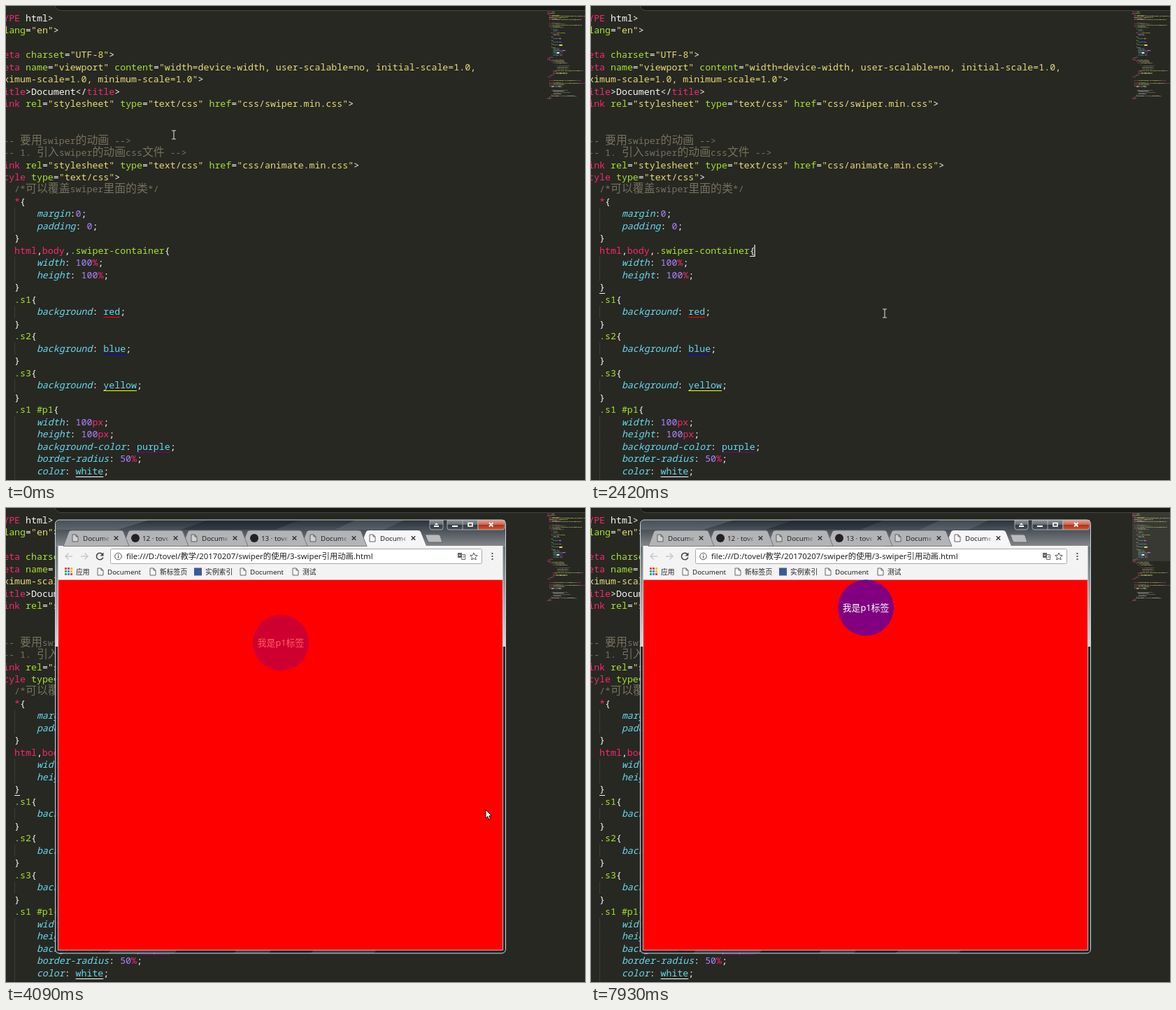
Recreate the animation shown at these times as an HTML page. Size 828 by 677 pixels, loop 8000 ms.

```html
<!DOCTYPE html>
<html lang="zh">
<head>
<meta charset="utf-8">
<title>Swiper animation lesson</title>
<style>
html, body { margin: 0; width: 100%; height: 100%; overflow: hidden; background: #272822; }
#stage { position: relative; width: 828px; height: 677px; overflow: hidden; }
#stage > svg { position: absolute; left: 0; top: 0; }
.code { position: absolute; left: -51.5px; top: 8.7px; font: 500 13.25px "Noto Sans Mono", monospace; color: #f8f8f2; }
.code div { height: 17.49px; line-height: 17.49px; white-space: pre; }
.code i { font-style: normal; }
.code b { font: 400 15.9px/0 "Noto Sans CJK SC", sans-serif; }
.code .p { color: #f92672; }
.code .g { color: #a6e22e; }
.code .y { color: #e6db74; }
.code .v { color: #ae81ff; }
.code .k { color: #75715e; }
.code .c { color: #66d9ef; font-style: italic; }
.code .u { color: #66d9ef; text-decoration: underline 1.2px var(--u); text-underline-offset: 3px; text-decoration-skip-ink: none; }
#map { position: absolute; left: 774px; top: 8px; width: 54px; height: 132px; overflow: hidden; filter: brightness(1.3); }
#map .code { left: 0; top: 0; font-weight: 700; transform: scale(.09); transform-origin: 0 0; }
#map .u { background: var(--u); }
.ui { font-family: "Noto Sans", "Noto Sans CJK SC", sans-serif; font-size: 9.8px; }
</style>
</head>
<body>
<div id="stage">
  <div class="code" id="code"></div>
  <div id="map"></div>
  <svg width="828" height="677" class="ui">
    <defs>
      <linearGradient id="glass" x2="0" y2="1">
        <stop stop-color="#2a3138"/><stop offset=".5" stop-color="#555c62"/><stop offset="1" stop-color="#85898c"/>
      </linearGradient>
      <linearGradient id="side" x2="0" y2="1">
        <stop stop-color="#6b7074"/><stop offset="1" stop-color="#d5d9dc"/>
      </linearGradient>
      <linearGradient id="close" x2="0" y2="1">
        <stop stop-color="#e0a192"/><stop offset=".45" stop-color="#cf6450"/><stop offset=".5" stop-color="#b5301c"/><stop offset="1" stop-color="#c65a3c"/>
      </linearGradient>
      <linearGradient id="button" x2="0" y2="1">
        <stop stop-color="#8a9094"/><stop offset=".48" stop-color="#656b70"/><stop offset=".5" stop-color="#33393e"/><stop offset="1" stop-color="#4c5358"/>
      </linearGradient>
      <linearGradient id="fade" gradientUnits="userSpaceOnUse" x1="27" x2="41">
        <stop stop-color="#222"/><stop offset="1" stop-color="#222" stop-opacity="0"/>
      </linearGradient>
      <clipPath id="frame"><rect x="71" y="17" width="644" height="619" rx="5"/></clipPath>
    </defs>

    <!-- editor chrome -->
    <path d="M70 0Q73 6.5 79 6.5H828V0z" fill="#191a16"/>
    <path d="M70 0Q73 6.5 79 6.5H828" fill="none" stroke="#45463f"/>
    <path d="M0 676H828V677H0z" fill="#1f201b"/>
    <g id="guides" fill="#3b3c35"></g>
    <rect id="view" x="774" y="7" width="54" height="69" fill="#fff" opacity=".08"/>
    <g fill="#f8f8f2">
      <rect id="caret" x="233.5" y="341" width="1.2" height="17"/>
      <rect id="open" x="227" y="357" width="7" height="1"/>
      <rect id="shut" x="12" y="410" width="8" height="1"/>
    </g>

    <g id="win">
      <g clip-path="url(#frame)">
        <rect x="70" y="17" width="646" height="620" fill="#23292b" opacity=".93"/>
        <rect x="70" y="17" width="646" height="38" fill="url(#glass)"/>
        <path d="M70 17H205L160 31H70z" fill="#8d969c" opacity=".3"/>
        <path d="M290 17H420L385 31H250z" fill="#0f151b" opacity=".35"/>
        <path d="M500 17H570L540 31H470z" fill="#9fa9b0" opacity=".18"/>
        <path d="M70 55h5V198h-5zM710 55h6V198h-6z" fill="url(#side)"/>
        <path d="M150 631h95l-5 6h-95zM330 631h50l-5 6h-50zM440 631h90l-5 6h-90z" fill="#5b6468" opacity=".45"/>
      </g>
      <rect x="70.5" y="17" width="644" height="619" rx="5.5" fill="none" stroke="#cbd6dc"/>
      <g stroke="#bcc4c9" stroke-width=".8">
        <path d="M606 17.500H625V28q0 3-3 3H609q-3 0-3-3z" fill="url(#button)"/>
        <path d="M631 17.500H675V31H634q-3 0-3-3zM653 17.500V31" fill="url(#button)"/>
        <path d="M675 17.500H713V28q0 3-3 3H675z" fill="url(#close)"/>
      </g>
      <path d="M612 25h7v2h-7zM613 24q2.500-5 5 0zM638 25h8v2h-8z" fill="#fff"/>
      <rect x="661" y="21.500" width="6" height="4.500" fill="none" stroke="#fff" stroke-width="1.600"/>
      <path d="M691 21l5.500 5.500m0-5.500l-5.500 5.500" stroke="#fff" stroke-width="1.900"/>
      <path d="M599.500 38H618q2 0 3 2l3 9H606q-2 0-3-2z" fill="#b9bbbc" stroke="#666"/>

      <rect id="page" x="75" y="102" width="635" height="529.500"/>
      <path d="M75 54H710V102H75z" fill="#f3f3f3"/>
      <path d="M75 102.500H710" stroke="#b8b8b8"/>
      <path d="M74.500 54V631.500H710.500V54" fill="none" stroke="#cfd6d9" stroke-width=".8"/>

      <rect x="149.500" y="58.500" width="531" height="21" rx="2" fill="#fff" stroke="#a8a8a8"/>
      <path d="M95 69H85m4.500-4.500L85 69l4.500 4.500M107 69h10m-4.500-4.500L117 69l-4.500 4.500" fill="none" stroke="#c9c9c9" stroke-width="1.500"/>
      <circle cx="160.500" cy="69" r="4.800" fill="none" stroke="#555"/>
      <path d="M160 66h1.200v1.200H160zM160 68.300h1.200v3.400H160z" fill="#555"/>
      <text x="172" y="73" font-size="11.35" fill="#222">file:///D:/tovel/教学/20170207/swiper的使用/3-swiper引用动画.html</text>
      <path d="M669 64l1.500 3.400 3.700.4-2.800 2.500.8 3.700-3.200-1.900-3.200 1.900.8-3.700-2.800-2.500 3.700-.4z" fill="none" stroke="#555"/>
      <path d="M694.500 64h2v2h-2zM694.500 68h2v2h-2zM694.500 72h2v2h-2z" fill="#555"/>
      <g id="marks" fill="#222"></g>
      <g id="loading"></g>
      <g id="loaded"></g>

      <g id="ball">
        <circle cx="393" cy="142.500" r="40" fill="#800080"/>
        <text x="393" y="147" text-anchor="middle" font-size="12.8" font-weight="500" fill="#fff">我是p1标签</text>
      </g>
    </g>

    <path id="beam" d="M-3-6h2.500l.5.5.5-.5H3M-3 6h2.500l.5-.5.5.5H3M0-5.500v11" fill="none" stroke="#d8d8d2" stroke-width="1.100"/>
    <path id="arrow" d="M0 0V12l2.800-2.600L4.700 14l2-.8L4.900 8.700H8.600z" fill="#fff" stroke="#000" stroke-width=".9"/>
  </svg>
</div>

<script>
const $ = id => document.getElementById(id);

// Each piece starts with its colour key; pieces are parted by "|".
const link = file => `w    <|plink|g rel|w=|y"stylesheet"|g type|w=|y"text/css"|g href|w=|y"css/${file}"|w>`;
const prop = (name, value) => `c            ${name}|w: |${value}|w;`;
const size = (name, n, unit) => prop(name, `v${n}|p${unit}`);
const tint = (name, color) => prop(name, 'u' + color);
const rule = (selector, ...body) => [`g        ${selector}|w{`, ...body, 'w        }'];
const tag = (indent, name, attr = '', value = '') =>
  `w${' '.repeat(indent)}<|p${name}` + (attr && `|g ${attr}|w=|y"${value}"`) + '|w>';
const script = file => `w    <|pscript|g type|w=|y"text/javascript"|g src|w=|y"js/${file}"|w></|pscript|w>`;

const lines = [
  'w<!|pDOCTYPE|w html>',
  tag(0, 'html', 'lang', 'en'),
  tag(0, 'head'),
  tag(4, 'meta', 'charset', 'UTF-8'),
  'w    <|pmeta|g name|w=|y"viewport"|g content|w=|y"width=device-width, user-scalable=no, initial-scale=1.0,',
  'y    maximum-scale=1.0, minimum-scale=1.0"|w>',
  'w    <|ptitle|w>Document</|ptitle|w>',
  link('swiper.min.css'),
  'w', 'w',
  'k    <!-- 要用swiper的动画 -->',
  'k    <!-- 1. 引入swiper的动画css文件 -->',
  link('animate.min.css'),
  tag(4, 'style', 'type', 'text/css'),
  'k        /*可以覆盖swiper里面的类*/',
  'p        *|w{',
  'c            margin|w:|v0|w;',
  prop('padding', 'v0'),
  'w        }',
  'p        html|w,|pbody|w,|g.swiper-container|w{',
  size('width', 100, '%'),
  size('height', 100, '%'),
  'w        }',
  ...rule('.s1', tint('background', 'red')),
  ...rule('.s2', tint('background', 'blue')),
  ...rule('.s3', tint('background', 'yellow')),
  ...rule('.s1 #p1',
    size('width', 100, 'px'),
    size('height', 100, 'px'),
    tint('background-color', 'purple'),
    size('border-radius', 50, '%'),
    tint('color', 'white'),
    prop('text-align', 'ccenter'),
    size('line-height', 100, 'px')),
  tag(4, '/style'),
  tag(0, '/head'),
  tag(0, 'body'),
  tag(4, 'div', 'class', 'swiper-container'),
  tag(8, 'div', 'class', 'swiper-wrapper'),
  tag(12, 'div', 'class', 'swiper-slide s1'),
  'w',
  'k                <!--',
  'k                    2. 给元素添加动画的类 ani',
  'k                    swiper-animate-effect',
  'k                    swiper-animate-duration',
  'k                    swiper-animate-delay -->',
  'w            <|pp|g class|w=|y"ani"|g id|w=|y"p1"|g swiper-animate-effect|w=|y"fadeInUp"|w></|pp|w>',
  tag(12, '/div'),
  tag(12, 'div', 'class', 'swiper-slide s2'),
  tag(12, 'div', 'class', 'swiper-slide s3'),
  tag(8, '/div'),
  tag(4, '/div'),
  tag(0, '/body'),
  'w', 'w',
  script('swiper.min.js'),
  'w',
  'k    <!-- 3. 引入动画js文件 -->',
  script('swiper.animate.min.js'),
  tag(4, 'script', 'type', 'text/javascript'),
  'c    var|w swiper = |pnew|w Swiper({',
  'w        onInit: |cfunction|w(s) {',
  'w', 'w',
  'k        //隐藏动画元素 swiperAnimateCache',
  'w            swiperAnimateCache(s);',
  'k            //初始化完成开始动画 swiperAnimate',
  'w            swiperAnimate(s);',
  'w        },',
  'w        onSlideChangeEnd: |cfunction|w(s) { swiperAnimate(s); }',
  'w    });',
  tag(0, '/script'),
  tag(0, '/html')
];

const piece = s => {
  const text = s.slice(1).replace(/</g, '&lt;').replace(/[\u4e00-\u9fff]+/g, '<b>$&</b>');
  return `<i class="${s[0]}" style="--u:${s[0] === 'u' ? s.slice(1) : 'none'}">${text}</i>`;
};
$('code').innerHTML = lines.map(l => `<div>${l.split('|').map(piece).join('')}</div>`).join('');
$('map').innerHTML = `<div class="code">${$('code').innerHTML}</div>`;
$('guides').innerHTML = lines.map((l, n) => /^c {12}/.test(l)
  ? `<rect x="12" y="${8.5 + n * 17.49}" width="1" height="17.5"/>` : '').join('');

// Browser tabs and bookmarks
const sheet = (x, y) =>
  `<path d="M${x} ${y - 5}h5l3 3v7h-8zm5 0v3h3" fill="#fff" fill-opacity=".4" stroke="#555" stroke-width=".9"/>`;
const cross = (x, y, r, w) =>
  `<path d="M${x - r} ${y - r}l${2 * r} ${2 * r}m0-${2 * r}l-${2 * r} ${2 * r}" stroke="#333" stroke-width="${w}"/>`;
const titles = ['Document', '12 · tovel', 'Document', '13 · tovel', 'Document', 'Document'];

function tab(n, pitch, lastWidth) {
  const active = n === 5, opening = active && lastWidth < 80;
  const x = 82 + n * pitch, w = active ? lastWidth : pitch + 9;
  const shape = `M${x} 54.5L${x + 8} 34q1-2 4-2H${x + w - 12}q3 0 4 2L${x + w} 54.5z`;
  const icon = opening ? `<circle cx="${x + 18}" cy="39" r="1" fill="#888"/>`
    : n % 2 && !active ? `<circle cx="${x + 18}" cy="43" r="6" fill="#222"/>`
    : sheet(x + 13, 43);
  const label = opening ? `<text x="${x + 28}" y="46.500" fill="#222">正</text>`
    : `<svg x="${x + 28}" y="32" width="${pitch - 48}" height="22"><text y="14.500" fill="url(#fade)">${titles[n]}</text></svg>`;
  return `<path d="${shape}" fill="${active ? '#f6f6f6' : '#b3b4b5'}" stroke="${active ? 'none' : '#62666a'}" stroke-width=".8"/>`
    + icon + label + cross(x + w - 18.5, 43, 2.8, 1.4);
}
const tabs = (pitch, lastWidth) => [5, 4, 3, 2, 1, 0].map(n => tab(n, pitch, lastWidth)).join('');
const reload = '<path d="M138 66a4.800 4.800 0 1 0 .8 4.500" fill="none" stroke="#444" stroke-width="1.600"/>'
  + '<path d="M139.500 63.500v5h-5z" fill="#444"/>';
const translate = '<path d="M646 64h6v7h-6z" fill="#666"/><path d="M651.500 66.500h5v7h-5z" fill="#fff" stroke="#666"/>'
  + '<path d="M647.500 67.500h2.500" stroke="#fff"/><path d="M653 69h2.500m-2.500 2.500l2.500-2" stroke="#666" stroke-width=".8"/>';

$('loading').innerHTML = tabs(90, 64) + cross(134, 69, 4.5, 1.6);
$('loaded').innerHTML = tabs(85, 94) + reload + translate;

const dots = ['#e8453c', '#e8453c', '#f9bb2d', '#3aa757', '#4688f1', '#f9bb2d', '#3aa757', '#4688f1', '#e8453c'];
const marks = [[131, 'Document'], [206, '新标签页'], [270, '实例索引'], [335, 'Document'], [410, '测试']];
$('marks').innerHTML = dots.map((c, i) =>
  `<rect x="${84 + i % 3 * 4}" y="${85 + (i / 3 | 0) * 4}" width="3" height="3" fill="${c}"/>`).join('')
  + '<text x="100" y="94.500">应用</text>'
  + marks.map(([x, name], i) => (i === 2
    ? '<rect x="269" y="85.500" width="11" height="11" fill="#3b5998"/>' : sheet(x, 91))
    + `<text x="${x + (i === 2 ? 15 : 14)}" y="94.500">${name}</text>`).join('');

// Pointer stops: time, x, y
const stops = [
  [0, 240, 184], [150, 255, 206], [270, 180, 185], [390, 111, 147], [540, 106, 141],
  [820, 190, 200], [940, 271, 249], [1090, 320, 280], [1210, 364, 303], [1330, 520, 400],
  [1600, 540, 425], [1720, 551, 440], [2270, 500, 439], [2420, 420, 439], [2540, 418, 439],
  [3000, 520, 444], [3120, 600, 444], [3270, 650, 440], [3390, 686, 431],
  [7240, 714, 462], [7390, 775, 560], [7510, 810, 640], [7660, 806, 660], [7810, 792, 668]
];

// cubic-bezier(.25, .1, .25, 1)
function ease(x) {
  const curve = (a, b, s) => 3 * a * s * (1 - s) ** 2 + 3 * b * s * s * (1 - s) + s ** 3;
  let lo = 0, hi = 1;
  for (let i = 0; i < 20; i++) {
    const mid = (lo + hi) / 2;
    if (curve(.25, .25, mid) < x) lo = mid; else hi = mid;
  }
  return curve(.1, 1, lo);
}

const show = (id, on) => $(id).style.display = on ? '' : 'none';

function draw(now) {
  const t = now % 8000;
  const browser = t >= 2540, ready = t >= 2690;
  const [, x, y] = stops.findLast(s => s[0] <= t);
  show('beam', !browser);
  show('arrow', browser && t < 7930);
  $(browser ? 'arrow' : 'beam').setAttribute('transform', `translate(${x} ${y})`);

  show('caret', t >= 1090 && t < 1660 || t >= 2270);
  show('open', t >= 1090);
  show('shut', t >= 1330);
  show('view', t >= 7390);

  show('win', browser);
  show('loading', !ready);
  show('loaded', ready);
  $('page').setAttribute('fill', ready ? '#f00' : '#fff');

  const p = ease(Math.min(1, Math.max(0, (t - 3620) / 2000)));
  show('ball', t >= 3820);
  $('ball').setAttribute('opacity', p);
  $('ball').setAttribute('transform', `translate(0 ${80 * (1 - p)})`);
}

const start = performance.now();
function loop() {
  draw(performance.now() - start);
  requestAnimationFrame(loop);
}
draw(0);
loop();
</script>
</body>
</html>
```
